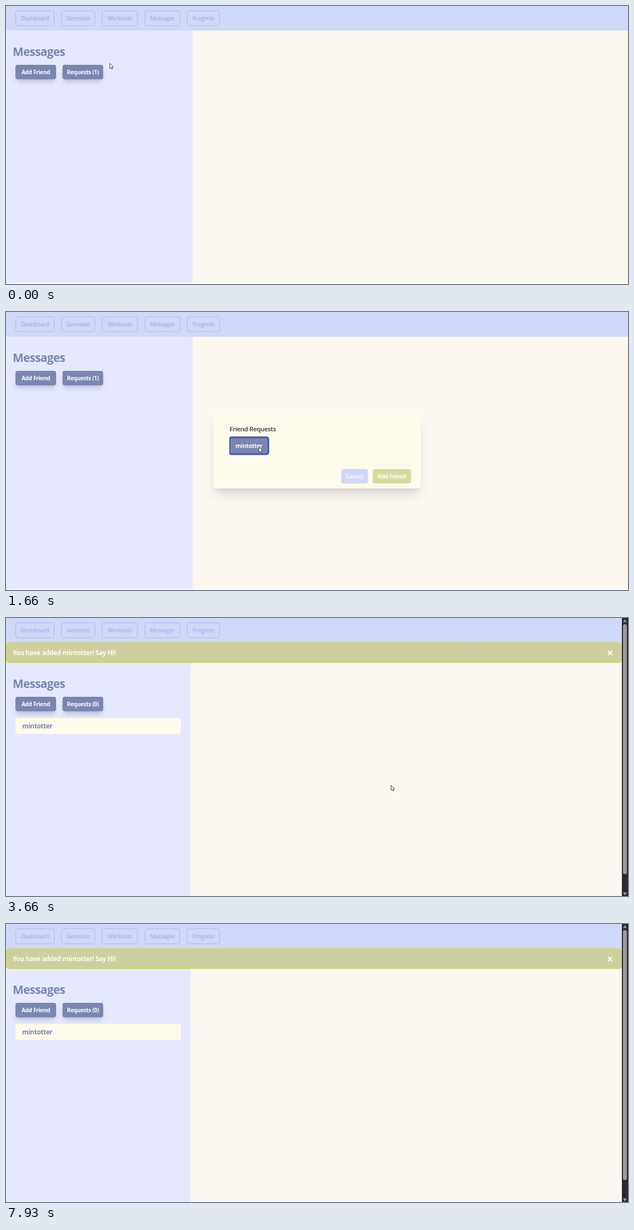
An HTML page with a canvas that plays this animation: 1117x501 px, repeating every 8000 ms.

```html
<!DOCTYPE html>
<html lang="en">
<head>
<meta charset="utf-8">
<title>Messages</title>
<style>
html, body { margin: 0; width: 100%; height: 100%; overflow: hidden; background: #fcf7f1; }
canvas { display: block; }
</style>
</head>
<body>
<canvas id="stage" width="1117" height="501"></canvas>
<script>
const ctx = document.getElementById('stage').getContext('2d');
const LOOP = 8000;
const FRIEND = 'mintotter';
const SLATE = '#7b86b0', CREAM = '#fefbed', LILAC = '#d0d8f7';

// When each step of the interaction happens, in ms
const OPEN = 330, SELECT = 1530, SETTLE = 1930, HOVER = 2400, ADDED = 3660;
const cursorStops = [
  [0, 186, 103], [60, 155, 118], [SELECT, 454, 243], [HOVER, 691, 301], [5600, 253, 125]
];
const CURSOR_GONE = 7930;

const navItems = [
  ['Dashboard', 17, 70], ['Generate', 99, 61], ['Workouts', 172, 64.5],
  ['Messages', 249, 63.5], ['Progress', 325, 59]
];

function rect(x, y, w, h, color) {
  ctx.fillStyle = color;
  ctx.fillRect(x, y, w, h);
}

function rounded(x, y, w, h, { fill, stroke, line = 1, radius = 4 }) {
  ctx.beginPath();
  ctx.roundRect(x, y, w, h, radius);
  if (fill) { ctx.fillStyle = fill; ctx.fill(); }
  if (stroke) { ctx.strokeStyle = stroke; ctx.lineWidth = line; ctx.stroke(); }
}

// Soft shadow of a box shrunk by inset; the box itself is painted over it
function dropShadow(x, y, w, h, offset, blur, inset, alpha) {
  ctx.save();
  ctx.shadowColor = `rgba(20,20,40,${alpha})`;
  ctx.shadowOffsetY = offset;
  ctx.shadowBlur = blur;
  rounded(x + inset, y + inset, w - 2 * inset, h - 2 * inset, { fill: '#000' });
  ctx.restore();
}

// Text is centred vertically on y
function label(text, x, y, size, color, { weight = 700, align = 'left' } = {}) {
  ctx.font = `${weight} ${size}px "Open Sans", "Noto Sans", sans-serif`;
  ctx.letterSpacing = -0.03 * size + 'px';
  ctx.textAlign = align;
  ctx.fillStyle = color;
  ctx.fillText(text, x, y + size * 0.36);
}

function button(text, x, y, w, fill, color = '#fff') {
  rounded(x, y, w, 26, { fill });
  label(text, x + w / 2, y + 13.3, 10, color, { align: 'center' });
}

function raisedButton(text, x, y, w) {
  dropShadow(x, y, w, 26, 7, 10, 2, 0.16);
  dropShadow(x, y, w, 26, 3, 4, 2, 0.12);
  button(text, x, y, w, SLATE);
}

function drawNav(width) {
  rect(0, 0, width, 44.5, LILAC);
  for (const [text, x, w] of navItems) {
    rounded(x + 0.5, 8.5, w - 1, 27, { stroke: '#aeb6ee' });
    label(text, x + w / 2, 22.3, 10, '#a8aeea', { weight: 600, align: 'center' });
  }
}

function drawSidebar(top, width, bottom, requests) {
  rect(0, top, width, bottom - top, '#e6e9fd');
  label('Messages', 12, top + 38, 20.7, SLATE);
  raisedButton('Add Friend', 17, top + 61.5, 73);
  raisedButton(`Requests (${requests})`, 101.5, top + 61.5, 73);
}

function drawRequest(t) {
  if (t < SELECT) return button(FRIEND, 401.5, 228, 64, SLATE);
  const grow = t < SETTLE ? 1.045 : 1;
  ctx.save();
  ctx.beginPath();
  ctx.rect(401, 220, 90, 42);
  ctx.clip();
  ctx.translate(436.3, 241);
  ctx.scale(grow, grow);
  rounded(-33.3, -14.5, 66.6, 29, { fill: SLATE, stroke: '#4a59ae', line: 3, radius: 3 });
  label(FRIEND, 0, 0.3, 10, '#fff', { align: 'center' });
  ctx.restore();
}

function drawModal(t) {
  const extra = t < SELECT ? 0 : 3;
  const box = [372.5, 187 - extra, 372.5, 128 + 2 * extra];
  dropShadow(...box, 15, 20, 4, 0.11);
  dropShadow(...box, 6, 8, 4, 0.1);
  rounded(...box, { fill: CREAM, radius: 6 });
  label('Friend Requests', 401.5, 214 - extra, 11.4, '#33353f', { weight: 600 });
  drawRequest(t);
  button('Cancel', 602, 280 + extra, 48, '#cfd7f6', '#f3f4fb');
  button('Add Friend', 658.5, 280 + extra, 69, t < HOVER ? '#d6daa2' : '#cbd65e', CREAM);
}

function drawAlert() {
  rounded(0.5, 44.5, 1105, 36, { fill: '#cdcf9f', stroke: '#cfd75c' });
  label(`You have added ${FRIEND}! Say Hi!`, 12, 63, 11.6, CREAM);
  ctx.strokeStyle = CREAM;
  ctx.lineWidth = 2;
  ctx.beginPath();
  ctx.moveTo(1081, 59); ctx.lineTo(1088.5, 67);
  ctx.moveTo(1088.5, 59); ctx.lineTo(1081, 67);
  ctx.stroke();
}

function drawScrollbar() {
  rect(1106, 0, 11, 501, '#2b2a2c');
  rounded(1108, 11, 7, 450.5, { fill: '#9d9b9c', radius: 3.5 });
  for (const [tip, base] of [[2, 7.5], [500, 494.5]]) {
    ctx.beginPath();
    ctx.moveTo(1111.5, tip);
    ctx.lineTo(1115, base);
    ctx.lineTo(1108, base);
    ctx.fillStyle = '#9d9b9c';
    ctx.fill();
  }
}

function drawCursor(t) {
  if (t >= CURSOR_GONE) return;
  const [, x, y] = cursorStops.findLast(([start]) => t >= start);
  ctx.save();
  ctx.translate(x + 0.5, y + 0.5);
  const arrow = new Path2D('M0 0V9L2.1 7.2 3.6 10.5 5.1 9.8 3.7 6.6 6.4 6.4Z');
  ctx.fillStyle = '#fff';
  ctx.strokeStyle = '#33343f';
  ctx.lineWidth = 0.9;
  ctx.fill(arrow);
  ctx.stroke(arrow);
  ctx.restore();
}

function draw() {
  const t = performance.now() % LOOP;
  const added = t >= ADDED;
  rect(0, 0, 1117, 501, t < 60 ? '#faf8f0' : '#fcf7f1');
  drawNav(added ? 1106 : 1117);
  if (added) {
    drawSidebar(80.5, 331.5, 501, 0);
    drawAlert();
    rounded(17, 180, 297, 29, { fill: CREAM, radius: 3 });
    label(FRIEND, 29, 194.8, 11.7, SLATE);
    drawScrollbar();
  } else {
    drawSidebar(44.5, 335, 499.5, 1);
    rect(0, 499.5, 1117, 1.5, '#fefefe');
    if (t >= OPEN) drawModal(t);
  }
  drawCursor(t);
  requestAnimationFrame(draw);
}
draw();
</script>
</body>
</html>
```
